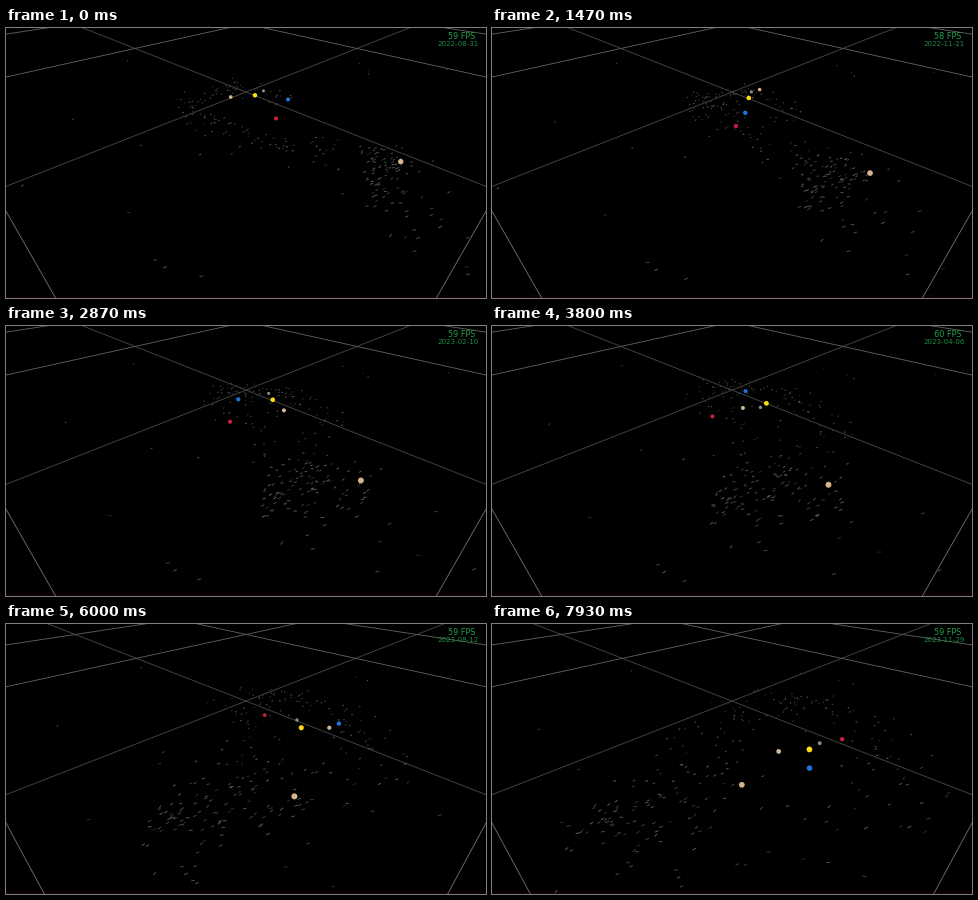
Recreate the animation shown at these times as a matplotlib script. Size 480 by 270 pixels, loop 8 s.

```python
import numpy as np
import matplotlib.pyplot as plt
from matplotlib.animation import FuncAnimation
from matplotlib.collections import LineCollection

W, H, DPI = 480, 270, 100
FRAMES, FPS = 120, 15
PX = 72 / DPI                        # one pixel in points
SPAN, DAYS_PER_FRAME = 459, 3.89
START = np.datetime64("2022-08-31")
RATES = [59, 59, 58, 59, 59, 60, 60, 59, 59, 57, 59]

# Ground positions are complex: sideways + 1j * forward, in AU from the camera.
FOCAL, HEIGHT, GRID_STEP = 326, 3.846, 9.25
TILT_FRAME = 60                      # the camera pitches once


def pitch(k):
    return np.radians(34.85 if k < TILT_FRAME else 32.65)


def project(g, p):
    depth = g.imag * np.cos(p) + HEIGHT * np.sin(p)
    down = HEIGHT * np.cos(p) - g.imag * np.sin(p)
    return W / 2 + FOCAL * g.real / depth + 1j * (H / 2 + FOCAL * down / depth), depth


def unproject(z, p):
    ray = (z - (W + 1j * H) / 2) / FOCAL
    scale = HEIGHT / (np.sin(p) + ray.imag * np.cos(p))
    return scale * (ray.real + 1j * (np.cos(p) - ray.imag * np.sin(p)))


def smooth(x, knots, values):
    """Cubic Hermite interpolation."""
    slope = np.gradient(values, knots, axis=0)
    i = np.clip(np.searchsorted(knots, x, "right") - 1, 0, len(knots) - 2)
    h = knots[i + 1] - knots[i]
    s = (x - knots[i]) / h
    return ((1 + 2 * s) * (1 - s) ** 2 * values[i] + s * (1 - s) ** 2 * h * slope[i]
            + s * s * (3 - 2 * s) * values[i + 1] - s * s * (1 - s) * h * slope[i + 1])


def sun(t):
    return 0.265 + 9.01j + t * (1.06 - 0.95j + t * (1.14 - 0.517j - t * (0.68 + 1.181j)))


def giant(t):
    return 3.214 + 5.572j + t * (-2.5 - 2.45j + t * (-1.405 + 1.062j + t * (0.859 + 0.907j)))


def kepler(day, axis, ecc, perihelion, passage, period):
    """Offset from the sun on an elliptic orbit."""
    mean = 2 * np.pi * (day - passage) / period
    e_anom = mean
    for _ in range(20):
        e_anom = mean + ecc * np.sin(e_anom)
    orbit = axis * (np.cos(e_anom) - ecc + 1j * np.sqrt(1 - ecc**2) * np.sin(e_anom))
    return np.conj(orbit * np.exp(1j * np.radians(perihelion)))


def body_positions(day):
    t = day / SPAN
    centre = sun(t)
    inner = [
        kepler(day, 0.38, 0.2, 85, 30, 90.5),
        kepler(day, 0.72, 0, 170, 0, 226.6),
        kepler(day, 0.985, 0.22 * t * t, 115, 464, 365.25),   # slowly perturbed
        kepler(day, 1.37, 0.29, 298, 425, 600),
    ]
    return np.array([centre, *(centre + p for p in inner), giant(t)])


RADII = np.array([0.066, 0.0455, 0.054, 0.058, 0.0525, 0.056])
COLORS = ["#ffdc12", "#8e8e86", "#d0b494", "#1f74de", "#c6203c", "#d4b48c"]

# Centre line of the swarm, from its inner head to its outer tail.
SPINE_FRAMES = np.array([0, 72, 119])
SPINE = np.array([
    unproject(np.array(points) @ [1, 1j], pitch(k))
    for k, points in zip(SPINE_FRAMES, [
        [(286, 74), (232, 57), (188, 76), (235, 109), (330, 124), (392, 134), (377, 163), (470, 222)],
        [(340, 150), (335, 100), (280, 72), (220, 80), (300, 170), (255, 175), (213, 194), (345, 192)],
        [(300, 222), (400, 145), (345, 82), (262, 82), (215, 122), (180, 188), (122, 194), (250, 230)],
    ])
])
KNOTS = np.arange(8)

rng = np.random.default_rng(7)
counts = [28, 30, 46, 32, 36, 50, 28]
u = np.repeat(np.arange(7), counts) + rng.random(sum(counts))
offset = rng.normal(size=u.size) + 1j * rng.normal(size=u.size)
offset *= np.interp(u, [0, 5, 6, 7], [0.32, 0.3, 0.2, 0.6])

STRAYS = 14
stray_start = rng.uniform(0, W, STRAYS) + 1j * rng.uniform(10, 255, STRAYS)
stray_speed = rng.uniform(-0.5, 0.3, STRAYS) + 0.12j
heading = np.exp(-1j * rng.normal(0.45, 0.25, u.size + STRAYS))
shade = rng.uniform(0.16, 0.4, u.size + STRAYS)


def swarm(k):
    line = smooth(k, SPINE_FRAMES, SPINE)
    ground = smooth(u, KNOTS, line) + offset * (1 + k / FRAMES)
    return np.concatenate([project(ground, pitch(k))[0], stray_start + stray_speed * k])


def xy(z):
    return np.stack([z.real, z.imag], -1)


def grid(p):
    """Diagonal floor lines, mirrored about the view axis."""
    forward = np.array([0, 100])
    return [xy(project(side * (GRID_STEP * n - forward) + 1j * forward, p)[0])
            for n in range(4) for side in (1, -1)]


fig = plt.figure(figsize=(W / DPI, H / DPI), dpi=DPI, facecolor="black")
ax = fig.add_axes([0, 0, 1, 1])
ax.set(xlim=(0, W), ylim=(H, 0))
ax.axis("off")
ax.axhspan(267, 270, color="#0c0004", lw=0)

grid_grays = [str(g) for g in (0.42, 0.27, 0.37, 0.37) for _ in range(2)]
grid_lines = ax.add_collection(LineCollection([], colors=grid_grays, linewidths=0.9 * PX))
dust = ax.add_collection(LineCollection(
    [], colors=[str(s) for s in shade], linewidths=0.9 * PX))
bodies = ax.scatter(np.zeros(6), np.zeros(6), c=COLORS, lw=0, zorder=3)


def label(x, y, size, color):
    return ax.text(x, y, "", family="DejaVu Sans", size=size * PX, color=color,
                   ha="center", va="center_baseline", zorder=4)


rate_text = label(456, 7.2, 8.2, "#1fa04a")
date_text = label(452, 15.2, 7.2, "#1c8c42")


def draw(k):
    day = DAYS_PER_FRAME * max(k - 1, 0)      # the first picture is held
    p = pitch(k)
    grid_lines.set_segments(grid(p))

    here = swarm(k)
    half = heading * np.interp(here.imag, [50, 110, 190], [1.2, 1.9, 3.8]) / 2
    dust.set_segments(np.stack([xy(here - half), xy(here + half)], axis=1))

    spots, depth = project(body_positions(day), p)
    bodies.set_offsets(xy(spots))
    bodies.set_sizes((2 * RADII * FOCAL / depth * PX) ** 2)

    rate_text.set_text(f"{RATES[k // 11]} FPS")
    date_text.set_text(str(START + int(round(day))))
    return grid_lines, dust, bodies, rate_text, date_text


anim = FuncAnimation(fig, draw, frames=FRAMES, interval=1000 / FPS,
                     repeat=True, repeat_delay=0)
plt.show()
```
